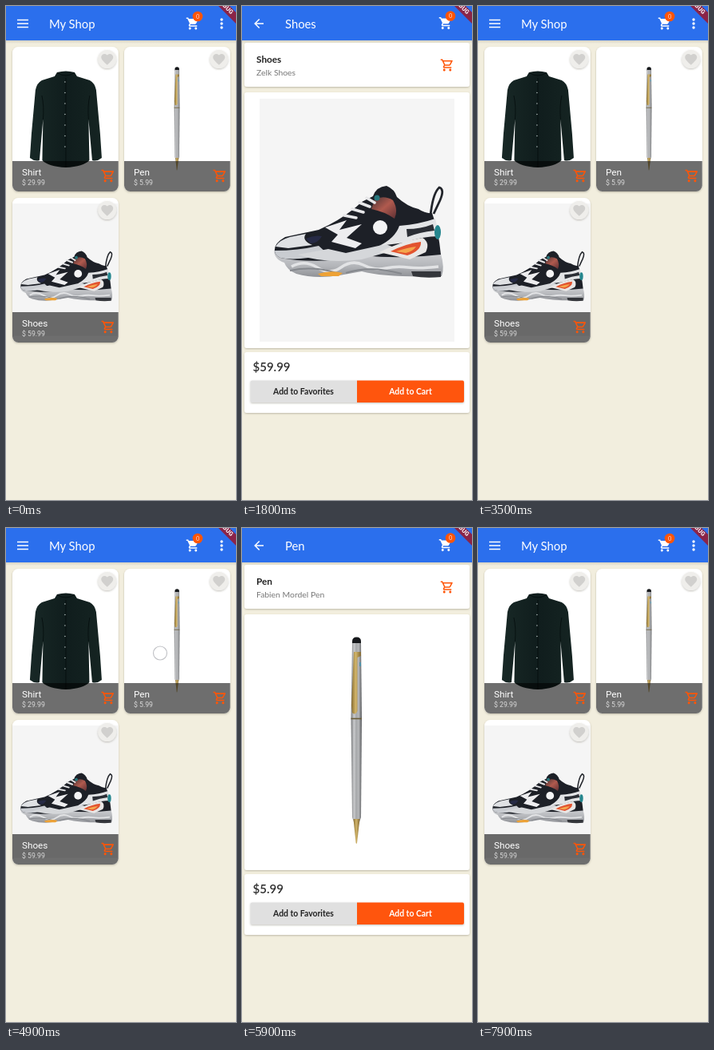
Animation, 288 px wide and 618 px high, one loop 8000 ms. Source, as an HTML page:

```html
<!DOCTYPE html>
<html lang="en">
<head>
<meta charset="utf-8">
<title>My Shop</title>
<style>
  html, body { margin: 0; width: 100%; height: 100%; overflow: hidden; background: #f2eede; }
  svg { display: block; width: 288px; height: 618px; }
  text { font-family: Lato, sans-serif; }
  .tile text { font-family: Roboto, sans-serif; }
</style>
</head>
<body>
<svg id="stage" viewBox="0 0 288 618" xmlns="http://www.w3.org/2000/svg">
  <defs>
    <linearGradient id="barShade" x2="0" y2="1">
      <stop stop-color="#8d8a80" stop-opacity=".28"/><stop offset="1" stop-color="#8d8a80" stop-opacity="0"/>
    </linearGradient>
    <linearGradient id="silver">
      <stop stop-color="#77797b"/><stop offset=".28" stop-color="#c9cacc"/><stop offset=".5" stop-color="#a5a7a9"/>
      <stop offset=".7" stop-color="#b9babc"/><stop offset="1" stop-color="#595b5e"/>
    </linearGradient>
    <linearGradient id="gold">
      <stop stop-color="#866b2f"/><stop offset=".45" stop-color="#d2b56a"/><stop offset="1" stop-color="#806733"/>
    </linearGradient>
    <linearGradient id="cloth">
      <stop stop-color="#182826"/><stop offset=".5" stop-color="#101d1d"/><stop offset="1" stop-color="#152422"/>
    </linearGradient>
    <linearGradient id="mesh" x2="1" y2="1">
      <stop stop-color="#4a3436"/><stop offset=".5" stop-color="#b05a4e"/><stop offset="1" stop-color="#5e3034"/>
    </linearGradient>
    <linearGradient id="bubble" x2="0" y2="1">
      <stop stop-color="#d3d4d7"/><stop offset=".6" stop-color="#b3b5b9"/><stop offset="1" stop-color="#8f9196"/>
    </linearGradient>
    <filter id="lift" x="-10%" y="-10%" width="120%" height="125%">
      <feDropShadow dx="0" dy="1" stdDeviation="1.3" flood-color="#5c5640" flood-opacity=".35"/>
    </filter>
    <clipPath id="tileClip"><rect width="132.7" height="181" rx="7.5"/></clipPath>

    <path id="cart" d="M7 18c-1.1 0-1.99.9-1.99 2S5.9 22 7 22s2-.9 2-2-.9-2-2-2zM1 2v2h2l3.6 7.59-1.35 2.45c-.16.28-.25.61-.25.96 0 1.1.9 2 2 2h12v-2H7.42c-.14 0-.25-.11-.25-.25l.03-.12.9-1.63h7.45c.75 0 1.41-.41 1.75-1.03l3.58-6.49A1 1 0 0 0 20 4H5.21l-.94-2H1zm16 16c-1.1 0-1.99.9-1.99 2s.89 2 1.99 2 2-.9 2-2-.9-2-2-2z"/>
    <path id="cartLine" d="M15.55 13c.75 0 1.41-.41 1.75-1.03l3.58-6.49A1 1 0 0 0 20 4H5.21l-.94-2H1v2h2l3.6 7.59-1.35 2.44C4.52 15.37 5.48 17 7 17h12v-2H7l1.1-2h7.45zM6.16 6h12.15l-2.76 5H8.53zM7 18c-1.1 0-1.99.9-1.99 2S5.9 22 7 22s2-.9 2-2-.9-2-2-2zm10 0c-1.1 0-1.99.9-1.99 2s.89 2 1.99 2 2-.9 2-2-.9-2-2-2z"/>
    <path id="heart" d="M12 21.35l-1.45-1.32C5.4 15.36 2 12.28 2 8.5 2 5.42 4.42 3 7.5 3c1.74 0 3.41.81 4.5 2.09C13.09 3.81 14.76 3 16.5 3 19.58 3 22 5.42 22 8.5c0 3.78-3.4 6.86-8.55 11.54z"/>

    <!-- Product pictures, centred on the origin -->
    <g id="shirt" transform="translate(-74.5 -141.5)">
      <path fill="url(#cloth)" d="M64 83Q75 80 86 83L89 88L105 93Q111 96 113 105L118 160L120 190Q114 195 108 193L103.500 142L104.500 193Q97 201 75 202Q53 201 45.500 193L46.500 142L42 193Q36 195 30 190L32 160L37 105Q39 96 45 93L61 88Z"/>
      <path d="M65 84Q75 90 85 84M75 90V201M46.500 142Q48 125 45 112M103.500 142Q102 125 105 112" fill="none" stroke="#050d0d" stroke-width=".8"/>
      <path d="M74 95V185" stroke="#b9c4c2" stroke-width="1.500" stroke-linecap="round" stroke-dasharray=".1 13.4"/>
    </g>

    <g id="pen" transform="translate(-144 -268)">
      <rect x="11" y="135" width="266" height="266" fill="#fff"/>
      <path d="M138 145V142Q138 136.500 143.500 136.500T149 142V145Z" fill="#16181b"/>
      <path d="M138 144H149L150 238L149 362L146 371H141L138 362L136.500 238Z" fill="url(#silver)"/>
      <path d="M139.500 364H147.500L144 394Q143.300 396 142.600 394Z" fill="url(#gold)"/>
      <path d="M140 155H149V160L144.500 162V229Q142 235 138 231L137 222Z" fill="url(#gold)"/>
      <path d="M136.500 238.500H150" stroke="#6a5c38" stroke-width="1.600"/>
      <path d="M148 168V173" stroke="#4f92a8" stroke-width="2"/>
    </g>

    <g id="shoes" transform="translate(-144 -268)">
      <rect x="22" y="116" width="244" height="304" fill="#f5f5f5"/>
      <path d="M236 262Q239 234 247 227Q254 229 248 243L240 260" fill="none" stroke="#22252b" stroke-width="2.800"/>
      <path d="M40 305Q40 317 53 321Q56 330 68 335Q92 342 122 337L150 332Q180 340 250 338Q254 327 249 310L150 306Z" fill="url(#bubble)"/>
      <path d="M62 326Q78 317 94 327T124 327T152 324T180 328T208 327T246 326" fill="none" stroke="#e2e3e5" stroke-width="3.500"/>
      <path d="M60 331Q90 325 118 334M130 334Q160 324 200 335" fill="none" stroke="#85888d" stroke-width="2"/>
      <path d="M95 335Q112 330 126 334L121 338H99Z" fill="#eda236"/>
      <path d="M212 332H249V339Q230 341 214 338Z" fill="#34363b"/>
      <path d="M41 306Q40 297 54 289L96 280Q128 266 150 245L164 238Q168 226 181 225Q191 229 194 239Q207 251 221 254Q230 260 238 259Q246 280 249 311Q200 317 150 312Q96 324 48 315Q41 312 41 306Z" fill="#1d2027"/>
      <path d="M166 242Q178 236 189 243Q196 255 191 266Q178 257 162 254Z" fill="url(#mesh)"/>
      <path d="M42 301Q46 293 60 289L80 285Q74 293 88 299L58 303Z" fill="#dfe1e4"/>
      <path d="M41 306Q70 306 96 300L106 309Q72 320 48 315Q41 312 41 306Z" fill="#c9ccd1"/>
      <path d="M80 291Q90 286 100 288Q95 297 86 297Z" fill="#262a45"/>
      <path d="M104 277L131 268L122 280L150 273L131 290L150 297L142 303L112 295L120 286Z" fill="#ededef"/>
      <path d="M128 262L143 265M138 254L152 258M147 246L160 251M156 240L166 246" stroke="#e8e8ea" stroke-width="3.500" stroke-linecap="round"/>
      <path d="M70 311L108 304L130 309L180 298L196 304L150 317Q104 323 70 311Z" fill="#d5d7da"/>
      <path d="M197 275Q222 273 242 266L247 288Q226 288 204 296L172 300Q192 290 197 275Z" fill="#e3e4e6"/>
      <path d="M206 279Q224 279 239 273L241 281Q222 283 207 289Z" fill="#2b2e35"/>
      <ellipse cx="245" cy="283" rx="4" ry="9" fill="#25868e"/>
      <circle cx="169" cy="240" r="3.500" fill="#28777d"/>
      <path d="M172 308Q200 294 226 290Q236 296 230 308L210 317Z" fill="#e9e7e6"/>
      <path d="M186 307Q206 297 224 295Q225 306 207 312Z" fill="#e2532f"/>
      <path d="M193 307Q208 302 218 301Q214 307 205 309Z" fill="#f4a64c"/>
      <circle cx="173" cy="277" r="9" fill="#f4f4f5"/>
    </g>
  </defs>
</svg>
<script>
const LOOP = 8000, FADE = 300, FADE_DELAY = 35;
const BLUE = '#2b6fed', ORANGE = '#ff5507', CREAM = '#f2eede';
const stage = document.getElementById('stage');

const products = [
  { id: 'shirt', title: 'Shirt', price: '29.99', x: 8, y: 51, scale: 1, cy: 141.5 },
  { id: 'pen', title: 'Pen', price: '5.99', x: 148, y: 51, scale: .5, cy: 142,
    subtitle: 'Fabien Mordel Pen', push: 5000, pop: 6451 },
  { id: 'shoes', title: 'Shoes', price: '59.99', x: 8, y: 240, scale: .545, cy: 330,
    subtitle: 'Zelk Shoes', push: 852, pop: 2802 }
];

const text = (x, y, size, fill, str, more = '') =>
  `<text x="${x}" y="${y}" font-size="${size}" fill="${fill}" ${more}>${str}</text>`;

const icon = (name, cx, cy, size, fill) =>
  `<use href="#${name}" fill="${fill}" transform="translate(${cx - size / 2} ${cy - size / 2}) scale(${size / 24})"/>`;

const card = (y, h) =>
  `<rect x="3" y="${y}" width="282" height="${h}" rx="3" fill="#fff" filter="url(#lift)"/>`;

const badgedCart = (x, y) => icon('cart', x, y, 18, '#fff') +
  `<circle cx="${x + 6}" cy="${y - 9}" r="6.3" fill="${ORANGE}"/>` +
  text(x + 6, y - 6.4, 7.3, '#f0d9d6', '0', 'text-anchor="middle"');

const appBar = (title, extras) => `
  <rect width="288" height="618" fill="${CREAM}"/>
  <rect y="43" width="288" height="4" fill="url(#barShade)"/>
  <rect width="288" height="43" fill="${BLUE}"/>
  ${text(54, 27.5, 14.8, '#fff', title)}${extras}`;

const tile = p => `
  <g class="tile" transform="translate(${p.x} ${p.y})">
    <rect width="132.7" height="181" rx="7.5" fill="#fff" filter="url(#lift)"/>
    <g clip-path="url(#tileClip)">
      <use id="${p.id}Thumb" href="#${p.id}" transform="translate(66.4 ${p.cy - p.y}) scale(${p.scale})"/>
      <rect y="143" width="133" height="38" fill-opacity=".57"/>
    </g>
    ${text(12, 161, 11.7, '#fff', p.title)}
    ${text(12, 172.5, 8.7, '#dadada', '$ ' + p.price)}
    ${icon('cartLine', 120, 161.5, 18.5, ORANGE)}
    <circle cx="118.700" cy="15.500" r="11.500" fill="#efeeeb" filter="url(#lift)"/>
    ${icon('heart', 118.7, 15.7, 18, '#d1d0ce')}
  </g>`;

const gridPage = () => appBar('My Shop', `
    <path d="M14 17.500H28M14 22H28M14 26.500H28" stroke="#fff" stroke-width="1.500"/>
    ${badgedCart(234, 22)}
    <path d="M270 17V27.200" stroke="#fff" stroke-width="3.400" stroke-linecap="round" stroke-dasharray=".01 5"/>`)
  + products.map(tile).join('');

const detailPage = p => `<g id="${p.id}Page">
  ${appBar(p.title, `
    <path d="M27 22H16.500M21.700 16.500L16.200 22L21.700 27.500" fill="none" stroke="#fff" stroke-width="1.500"/>
    ${badgedCart(255, 21.5)}`)}
  ${card(46, 55)}
  ${text(18, 70.5, 11.8, '#222', p.title, 'font-weight="700"')}
  ${text(18, 86.5, 10.4, '#777', p.subtitle)}
  ${icon('cartLine', 257, 74, 18, ORANGE)}
  ${card(108, 320)}
  ${card(433, 76)}
  ${text(13.5, 456.5, 15, '#2e2e2e', '$' + p.price, 'font-weight="600"')}
  <g filter="url(#lift)">
    <path d="M144 468.500H12.500Q10.500 468.500 10.500 470.500V494Q10.500 496 12.500 496H144Z" fill="#e0e0e0"/>
    <path d="M144 468.500H276Q278 468.500 278 470.500V494Q278 496 276 496H144Z" fill="${ORANGE}"/>
  </g>
  ${text(77, 486, 10.4, '#222', 'Add to Favorites', 'font-weight="700" text-anchor="middle"')}
  ${text(211, 486, 10.4, '#fff', 'Add to Cart', 'font-weight="700" text-anchor="middle"')}
  </g><use id="${p.id}Hero" href="#${p.id}"/>`;

const opened = products.filter(p => p.push);
stage.insertAdjacentHTML('beforeend', gridPage() + opened.map(detailPage).join('') + `
  <ellipse id="ripple" cx="240" cy="618" fill="#c6c2b7"/>
  <circle id="touch" r="8.500" fill="#fff" fill-opacity=".75" stroke="#c3c4c8" stroke-width="1.200"/>
  <path d="M266 0H280L288 8V22Z" fill="#8a2448"/>
  <text transform="translate(281.500 10.500) rotate(45)" font-size="7.500" font-weight="700" fill="#fff"
    text-anchor="end" style="font-family:Roboto,sans-serif">DEBUG</text>`);

const el = id => document.getElementById(id);
const show = (node, on) => node.setAttribute('display', on ? 'inline' : 'none');
const clamp = v => Math.min(1, Math.max(0, v));
const mix = (a, b, k) => a + (b - a) * k;
const ramp = (t, from) => clamp((t - from) / FADE);

// cubic-bezier(.4, 0, .2, 1)
function ease(x) {
  let lo = 0, hi = 1, s = .5;
  for (let i = 0; i < 18; i++) {
    s = (lo + hi) / 2;
    const r = 1 - s;
    if (1.2 * s * r * r + .6 * s * s * r + s * s * s < x) lo = s; else hi = s;
  }
  return s * s * (3 - 2 * s);
}

function drawPage(p, t) {
  const leaving = t >= p.pop;
  const fade = leaving ? 1 - ramp(t, p.pop + FADE_DELAY) : ramp(t, p.push);
  const fly = leaving ? 1 - ease(ramp(t, p.pop)) : ease(ramp(t, p.push));
  const page = el(p.id + 'Page'), hero = el(p.id + 'Hero');
  const on = fade > 0;
  show(page, on);
  show(hero, on);
  show(el(p.id + 'Thumb'), !on);
  page.setAttribute('opacity', fade);
  // The hero rises early and drifts sideways evenly.
  const x = mix(p.x + 66.4, 144, fly);
  const y = mix(p.cy, 268, 1 - Math.pow(1 - fly, 3));
  hero.setAttribute('transform', `translate(${x} ${y}) scale(${mix(p.scale, 1, fly)})`);
}

function drawRipple(t) {
  const ripple = el('ripple');
  const p = opened.find(q => t > q.pop - 60 && t < q.pop + 400);
  show(ripple, p);
  if (!p) return;
  const d = t - p.pop;
  ripple.setAttribute('rx', 42 - .02 * d);
  ripple.setAttribute('ry', 13.3 - .031 * d);
  ripple.setAttribute('opacity', clamp((d + 60) / 60) * clamp((400 - d) / 120));
}

function drawTouch(t) {
  const touch = el('touch');
  const first = t > 2800 && t < 3000;
  show(touch, first || (t > 4780 && t < 5000));
  touch.setAttribute('cx', first ? 223 : 193);
  touch.setAttribute('cy', first ? 455 : 156.5);
}

function draw(t) {
  opened.forEach(p => drawPage(p, t));
  drawRipple(t);
  drawTouch(t);
}

const start = performance.now();
function tick() {
  draw((performance.now() - start) % LOOP);
  requestAnimationFrame(tick);
}
tick();
</script>
</body>
</html>
```
